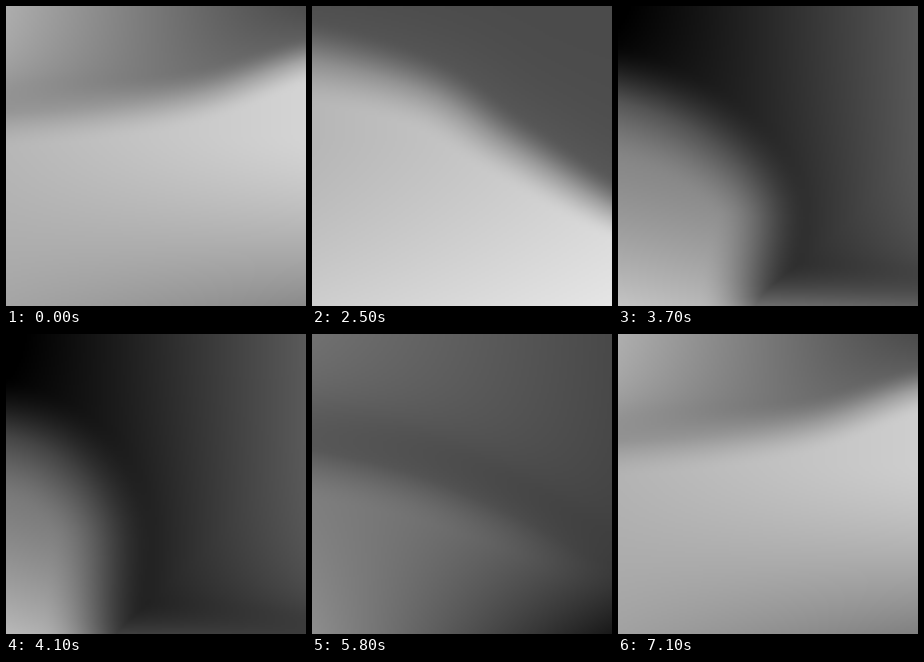
An HTML page with a canvas for the animation above (7.2 s loop, 300x300 px).

```html
<!DOCTYPE html>
<html lang="en">
<head>
<meta charset="utf-8">
<title>Grey flow</title>
<style>
  html, body { margin: 0; width: 100%; height: 100%; overflow: hidden; background: #999; }
  canvas { display: block; width: 100vw; height: 100vh; }
</style>
</head>
<body>
<canvas id="stage" width="300" height="300"></canvas>
<script>
const SIZE = 300, GRID = 150, LOOP = 7200, REST = 1000, STEP = 100;

const clamp = (v, lo = 0, hi = 1) => Math.min(hi, Math.max(lo, v));
const mix = (a, b, u) => a + (b - a) * u;
const smooth = u => u * u * (3 - 2 * u);

// A value that swings once per loop and is highest at the given phase.
const wave = (mean, swing, peak) => phase => mean + swing * Math.cos(2 * Math.PI * (phase - peak));

const waves = {
  skyLeft: wave(85, 95, 0.97), skyRight: wave(75, 15, 0.5),
  foot: wave(72, 55, 0.08),
  lightLeft: wave(150, 45, 0.12), lightRight: wave(150, 85, 0.12),
  floorLeft: wave(175, 33, 0.3), floorRight: wave(125, 105, 0.23),
  softness: wave(82, 23, 0.55),
};

// Key positions of the edge between the dark upper and the light lower part.
const edge = (at, ...points) => ({ at, points });
const edges = [
  edge(REST, [-20, 108], [100, 102], [200, 88], [320, 50]),
  edge(2500, [-20, 52], [110, 85], [200, 142], [330, 215]),
  edge(3300, [-20, 80], [115, 130], [200, 200], [212, 275]),
  edge(4100, [-20, 100], [55, 125], [100, 190], [100, 315]),
  edge(5300, [-20, 105], [80, 145], [160, 212], [290, 320]),
  edge(6300, [-20, 120], [100, 123], [210, 129], [320, 138]),
];
edges.push({ ...edges[0], at: LOOP });

function hermite(a, b, slopeA, slopeB, u) {
  const u2 = u * u, u3 = u2 * u;
  return mix(a, b, 3 * u2 - 2 * u3) + slopeA * (u3 - 2 * u2 + u) + slopeB * (u3 - u2);
}

// The edge rests at both ends of its path and moves smoothly in between.
function slope(i, k, c) {
  const before = edges[i - 1], after = edges[i + 1];
  return before && after ? (after.points[k][c] - before.points[k][c]) / (after.at - before.at) : 0;
}

function edgePoints(time) {
  if (time <= REST) return edges[0].points;
  const i = edges.findIndex(e => e.at > time) - 1;
  const a = edges[i], b = edges[i + 1], span = b.at - a.at;
  return a.points.map((p, k) => p.map((v, c) => hermite(v, b.points[k][c],
    slope(i, k, c) * span, slope(i + 1, k, c) * span, (time - a.at) / span)));
}

// A smooth curve through the points, which runs on to the right.
function edgeSegments(knots) {
  const [firstX, firstY] = knots[0], [lastX, lastY] = knots[3];
  const all = [[firstX - 100, firstY], ...knots, [lastX + 100, lastY]];
  const line = [all[0]];
  for (let i = 1; i < 4; i++) {
    for (let n = 0; n < 7; n++) {
      line.push([0, 1].map(c => hermite(all[i][c], all[i + 1][c],
        (all[i + 1][c] - all[i - 1][c]) / 2, (all[i + 2][c] - all[i][c]) / 2, n / 7)));
    }
  }
  line.push(knots[3], [lastX + SIZE, lastY]);
  return line.slice(1).map((q, i) => {
    const [x, y] = line[i], dx = q[0] - x, dy = q[1] - y;
    return { x, y, dx, dy, len2: dx * dx + dy * dy || 1 };
  });
}

// Positive below the edge, negative above it.
function edgeDistance(segments, x, y) {
  let best = Infinity, side = 1;
  for (const s of segments) {
    const px = x - s.x, py = y - s.y;
    const u = clamp((px * s.dx + py * s.dy) / s.len2);
    const ex = px - u * s.dx, ey = py - u * s.dy, d = ex * ex + ey * ey;
    if (d < best) {
      best = d;
      side = s.dx * py - s.dy * px < 0 ? -1 : 1;
    }
  }
  return side * Math.sqrt(best);
}

function greyAt(x, y, d, shade) {
  const across = x / SIZE;
  const sky = mix(shade.skyLeft, shade.skyRight, across);
  const light = mix(shade.lightLeft, shade.lightRight, across);
  const floor = mix(shade.floorLeft, shade.floorRight, across);
  const above = mix(sky, shade.foot, Math.exp(Math.min(0, d) / 42));
  const below = mix(light, floor, clamp((y - 130) / 170) ** 1.5);
  const width = shade.softness * mix(1.2, 0.8, across);
  return mix(above, below, smooth(clamp(d / width + 0.5)));
}

const ctx = document.getElementById('stage').getContext('2d');
const buffer = document.createElement('canvas');
buffer.width = buffer.height = GRID;
const bufferCtx = buffer.getContext('2d');
const image = bufferCtx.createImageData(GRID, GRID);

function draw(time) {
  const phase = Math.max(0, time - REST) / (LOOP - REST);
  const shade = {};
  for (const name in waves) shade[name] = waves[name](phase);
  const segments = edgeSegments(edgePoints(time));
  for (let i = 0; i < GRID * GRID; i++) {
    const x = (i % GRID + 0.5) * SIZE / GRID;
    const y = (Math.floor(i / GRID) + 0.5) * SIZE / GRID;
    const grey = greyAt(x, y, edgeDistance(segments, x, y), shade);
    image.data.set([grey, grey, grey, 255], i * 4);
  }
  bufferCtx.putImageData(image, 0, 0);
  ctx.drawImage(buffer, 0, 0, SIZE, SIZE);
}

let shown = -1;
function tick() {
  const time = Math.floor(performance.now() % LOOP / STEP) * STEP;
  if (time !== shown) draw(shown = time);
  requestAnimationFrame(tick);
}
tick();
</script>
</body>
</html>
```
